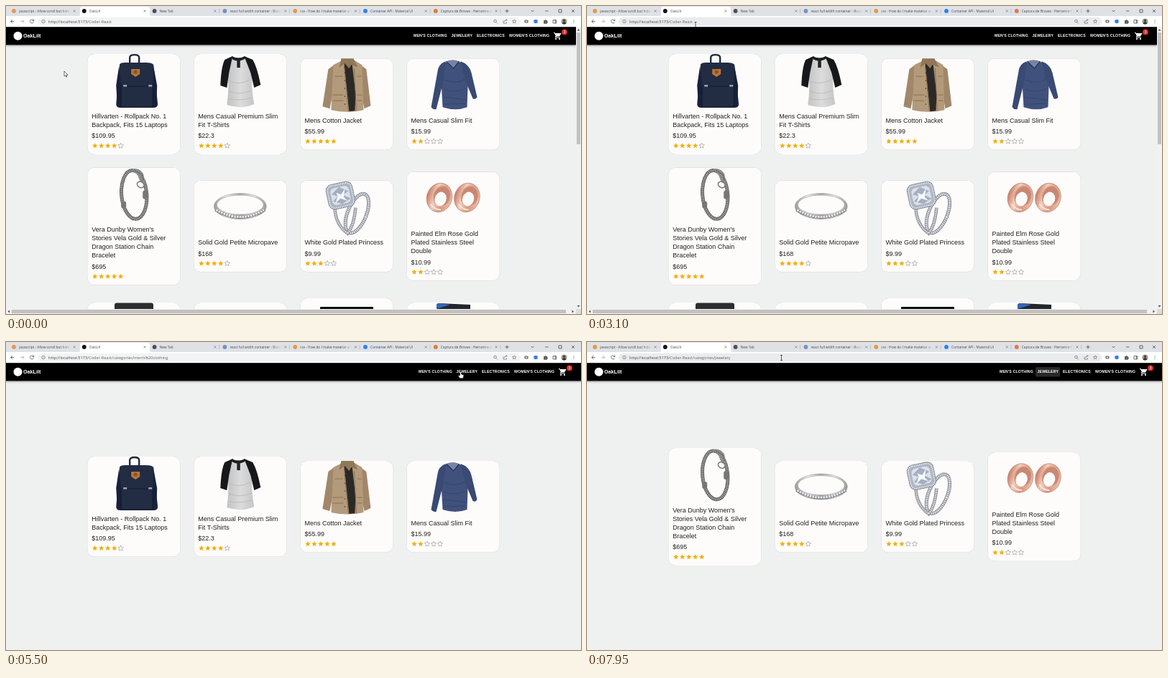
An HTML page for the animation above (8000 ms loop, 800x430 px).

```html
<!DOCTYPE html>
<html lang="en">
<head>
<meta charset="utf-8">
<title>Shop navigation</title>
<style>
html, body { margin: 0; width: 100%; height: 100%; overflow: hidden; background: #eff1f0; }
svg { display: block; }
.ui { font-family: "Open Sans", "Noto Sans", sans-serif; }
.page { font-family: "Liberation Sans", Arial, sans-serif; }
.title { font-size: 9px; fill: #212121; }
.link { font-size: 5.2px; font-weight: bold; letter-spacing: .15px; fill: #fff; }
.card { fill: #fdfcfb; filter: drop-shadow(0 .8px .7px rgba(0,0,0,.32)); }
.icon { fill: none; stroke: #5f6368; stroke-width: .9; }
.bar { filter: drop-shadow(0 1px 1.5px rgba(0,0,0,.4)); }
</style>
</head>
<body>
<svg id="stage" width="800" height="430" viewBox="0 0 800 430"></svg>
<script>
const LOOP = 8000, MENS_AT = 4900, JEWELERY_AT = 7600;
const STAR = "M12 17.27 18.18 21l-1.64-7.03L22 9.24l-7.19-.61L12 2 9.19 8.63 2 9.24l5.46 4.73L5.82 21z";
const CART = "M7 18c-1.1 0-2 .9-2 2s.9 2 2 2 2-.9 2-2-.9-2-2-2zM1 2v2h2l3.6 7.6-1.4 2.4c-.7 1.4.3 3 1.8 3h12v-2H7.4l1.1-2h7.5c.7 0 1.4-.4 1.7-1L21.7 5c.3-.7-.1-1-.9-1H5.2l-.9-2zM17 18c-1.1 0-2 .9-2 2s.9 2 2 2 2-.9 2-2-.9-2-2-2z";

const path = (d, fill, extra = "") => `<path d="${d}" fill="${fill}" ${extra}/>`;
const line = (d, color, width = 1, extra = "") =>
  path(d, "none", `stroke="${color}" stroke-width="${width}" ${extra}`);
const rect = (x, y, w, h, fill, r = 0) =>
  `<rect x="${x}" y="${y}" width="${w}" height="${h}" rx="${r}" fill="${fill}"/>`;
const dot = (x, y, r, fill) => `<circle cx="${x}" cy="${y}" r="${r}" fill="${fill}"/>`;
const oval = (x, y, rx, ry, angle, attrs) =>
  `<ellipse cx="${x}" cy="${y}" rx="${rx}" ry="${ry}" transform="rotate(${angle} ${x} ${y})" ${attrs}/>`;
const move = (x, y, body) => `<g transform="translate(${x} ${y})">${body}</g>`;

// Product pictures, in card coordinates
const backpack =
  line("M59 14V5Q59 1 65.500 1T72 5V14", "#20293c", 2.4) +
  path("M45 14Q47 12 52 12H82Q90 12 92 15L98 70Q98 75 92 75H46Q40 75 40 70Z", "#222c43") +
  path("M44 17 40 44 42 74H47V44ZM92 17 97 44 96 74H91V44Z", "#18213a") +
  line("M47 45H92M47 47V74H91V47", "#121a2d", .9) +
  path("M61 21H73V28L67 32 61 28Z", "#b87539") + dot(67, 25, 2.5, "#8a5125") +
  rect(50, 43, 5, 2.5, "#a3a8ae") + rect(85, 43, 5, 2.5, "#a3a8ae");

const raglan =
  path("M51 5H71L82 22Q79 45 84 70 66 78 46 71 50 45 46 20Z", "url(#cotton)") +
  path("M54 3 43 8Q38 18 37 44L46 47 49 26Z", "#17181b") +
  path("M70 3 82 8Q88 18 93 43L84 47 79 26Z", "#17181b") +
  path("M53 3Q62 8 71 3L72 6Q62 13 53 7Z", "#1d1e21") + rect(60, 8, 4.5, 11, "#222327") +
  line("M50 38Q62 44 78 36M49 52Q64 58 80 51M48 62Q62 66 81 61", "#b3b3b4", .7);

const jacket =
  path("M47 9 39 15 31 67 41 70 48 35ZM84 9 92 15 98 66 89 70 83 35Z", "#a1876a") +
  path("M46 9 58 3H76L86 9 88 72Q66 77 43 72Z", "#b29a7b") +
  path("M61 6H72L77 50 76 73 68 74Z", "#2c2826") +
  path("M57 0H74L80 12 71 9 68 14 62 7 54 13Z", "#8f7758") +
  line("M61 10 67 74M75 14 78 73M48 25H59M79 25H85M45 51H60M79 51H86M45 59H60M79 59H86", "#7e674a", .8) +
  [20, 31, 42, 53, 64].map(y => dot(62, y, .8, "#57462f")).join("");

const sweater =
  path("M53 5H75L86 12 84 68Q68 74 50 68L47 14Z", "#40517b") +
  path("M54 4Q44 8 43 18L34 68Q37 72 41 71L51 32ZM75 4Q87 8 90 20L98 54Q96 58 92 56L82 32Z", "#394a73") +
  path("M55 4Q64 0 73 4L65 14Z", "#7883a2") + line("M55 4 65 14 73 4", "#25345a", 1.3) +
  line("M53 30Q68 37 81 29M52 43Q66 49 83 42M51 54 83 58M51 64 82 63", "#32426a", .8);

const bracelet =
  oval(65, 38, 17.5, 34, -5, 'fill="none" stroke="#686868" stroke-width="5"') +
  oval(65, 38, 17.5, 34, -5, 'fill="none" stroke="#b4b4b4" stroke-width="3" stroke-dasharray="1 1.4"') +
  path("M63 2Q72 0 78 9L80 20 74 21 70 11Z", "#8d8d8d") + line("M66 4 76 10 78 18", "#444", 1, 'stroke-dasharray="2 1"') +
  oval(74, 24, 5, 4, 30, 'fill="#fdfcfb" stroke="#777" stroke-width="1.600"') +
  rect(77, 32, 8, 12, "#777", 3) + rect(47, 47, 7, 10, "#777", 3);

const band =
  path("M28 36a36.500 18 0 1 0 73 0a36.500 18 0 1 0-73 0M32 34a32.500 13.500 0 1 1 65 0a32.500 13.500 0 1 1-65 0", "url(#silver)", 'fill-rule="evenodd" stroke="#8b8b8b" stroke-width=".5"') +
  line("M30 41Q64 62 99 41", "#77787b", 4) + line("M31 41Q64 61 98 41", "#e8e8ea", 3, 'stroke-dasharray="2.800 1"');

const diamond =
  oval(79, 46, 13, 29, 22, 'fill="none" stroke="#8d9098" stroke-width="5"') +
  oval(79, 46, 13, 29, 22, 'fill="none" stroke="#dfe1e6" stroke-width="3" stroke-dasharray="1.600 1"') +
  line("M48 36Q48 61 66 74Q75 62 77 38", "#92959c", 4.5) +
  line("M48 36Q48 61 66 74Q75 62 77 38", "#dcdfe3", 2.4, 'stroke-dasharray="1.600 1"') +
  `<g transform="rotate(-12 56 21)">${rect(37, 3, 38, 36, "#858b98", 9)}
    <rect x="39" y="5" width="34" height="32" rx="7" fill="#aeb5c1" stroke="#e6e9ee" stroke-width="2.200" stroke-dasharray="1.500 1"/>
    ${rect(43, 9, 26, 24, "#dae1ec", 6)}` +
  path("M44 17 56 9 68 17 60 21 69 28 56 33 44 27 52 21Z", "#a5afc0") +
  path("M51 16 57 20 64 13 60 24 64 30 55 25 47 30 52 21Z", "#f7f9fc") + "</g>";

const roseRing = angle =>
  oval(0, 0, 17.5, 20.5, angle, 'fill="url(#rose)" stroke="#b8735d" stroke-width=".6"') +
  oval(angle / 5, -2, 12.500, 15, angle, 'fill="#c98872"') +
  oval(angle / 5, -2, 12, 14.500, angle, 'fill="none" stroke="#edc2ae" stroke-width="2" stroke-dasharray=".8 .8"') +
  oval(angle / 5 - 2, 2, 8, 10, angle, 'fill="#fdfcfb"') +
  line("M-12 9Q-7 17 2 17", "#fbe5da", 2);
const roseRings = move(45.500, 36, roseRing(18)) + move(84, 36, roseRing(18));

const product = (lines, price, stars, art) => ({ lines, price, stars, art });
const mens = [
  product(["Hillvarten - Rollpack No. 1", "Backpack, Fits 15 Laptops"], "$109.95", 4, backpack),
  product(["Mens Casual Premium Slim", "Fit T-Shirts"], "$22.3", 4, raglan),
  product(["Mens Cotton Jacket"], "$55.99", 5, jacket),
  product(["Mens Casual Slim Fit"], "$15.99", 2, sweater)
];
const jewelery = [
  product(["Vera Dunby Women's", "Stories Vela Gold &amp; Silver", "Dragon Station Chain", "Bracelet"], "$695", 5, bracelet),
  product(["Solid Gold Petite Micropave"], "$168", 4, band),
  product(["White Gold Plated Princess"], "$9.99", 3, diamond),
  product(["Painted Elm Rose Gold", "Plated Stainless Steel", "Double"], "$10.99", 2, roseRings)
];

const cardX = column => 113.2 + 148.1 * column;
const cardBox = height => `<rect class="card" width="129.300" height="${height}" rx="10"/>`;
const stars = (count, y) => [0, 1, 2, 3, 4].map(i =>
  `<path d="${STAR}" transform="translate(${6 + 9 * i} ${y - 4.6}) scale(.375)" ${i < count
    ? 'fill="#f5ad0c"' : 'fill="none" stroke="#9c9c9c" stroke-width="1.800"'}/>`).join("");

function card({ lines, price, stars: count, art }, column, centerY) {
  const height = 115.6 + 12.1 * lines.length;
  const priceY = 92.9 + 12.1 * lines.length;
  const text = lines.map((words, i) => `<text class="title" x="6" y="${89.7 + 12.1 * i}">${words}</text>`).join("");
  return move(cardX(column), centerY - height / 2, cardBox(height) + art + text +
    `<text class="title" x="6" y="${priceY}">${price}</text>` + stars(count, priceY + 10.8));
}
const row = (products, centerY) => products.map((p, i) => card(p, i, centerY)).join("");

const links = [["MEN'S CLOTHING", 567], ["JEWELERY", 619.5], ["ELECTRONICS", 655], ["WOMEN'S CLOTHING", 700]];
const navbar = (width, shift, focus = "") =>
  `<rect class="bar" y="29" width="${width}" height="25.300"/>` + focus +
  dot(16.5, 41.7, 6, "#fff") +
  '<text x="24" y="44.300" font-size="7.200" font-weight="bold" fill="#fff">OakLilt</text>' +
  move(shift, 0, links.map(([name, x]) => `<text class="link" x="${x}" y="43.300">${name}</text>`).join("") +
    `<path d="${CART}" fill="#fff" transform="translate(761.500 36) scale(.5)"/>` +
    dot(777, 36.4, 3.9, "#e0302f") +
    '<text x="777" y="38.100" font-size="4.800" fill="#fff" text-anchor="middle">3</text>');

const scrollbars =
  rect(793, 29, 7, 401, "#f1f1f1") + rect(0, 423, 800, 7, "#f1f1f1") + rect(793, 423, 7, 7, "#dcdcdc") +
  rect(794, 37, 5, 156, "#c1c1c1") + rect(8, 424, 771, 5, "#c1c1c1") +
  path("M794.500 34.500 796.500 32 798.500 34.500Z", "#505050") +
  path("M794.500 418 796.500 420.500 798.500 418Z M5 424.500 2.500 426.500 5 428.500Z M787.500 424.500 790 426.500 787.500 428.500Z", "#505050");

const nextRow =
  [414, 414, 408, 414].map((y, i) => move(cardX(i), y, cardBox(140))).join("") +
  rect(151, 414.5, 54, 20, "#2d2d30", 3) + rect(437, 420, 74, 9, "#08080a", 1) +
  path("M599 430V418Q599 415 603 415L646 417V430Z", "#25262b") + path("M599 423V417Q600 415 604 415L618 417Z", "#3565b8");

const pages = [
  row(mens, 137) + row(jewelery, 307.4) + nextRow + navbar(793, 0) + scrollbars,
  row(mens, 229.9) + navbar(800, 7),
  row(jewelery, 229.9) + navbar(800, 7, rect(624, 35, 34, 13.5, "#292929", 1.5))
];

const tabs = [
  ["javascript - Allow scroll but hide scrollbar", "#e8964c"], ["OakLilt", "#111"], ["New Tab", "#4d5156"],
  ["react full width container - Buscar", "#7b8fc0"], ["css - How do I make material ui co", "#e8964c"],
  ["Container API - Material UI", "#2684f5"], ["Captura de Brovex - Herramienta", "#e27a3f"]
];
const tab = ([title, color], i) => {
  const x = 97.8 * i;
  return dot(x + 11, 7, 2.9, color) +
    `<svg x="${x + 18}" width="73" height="14"><text y="8.700" font-size="4.800" fill="url(#fade)">${title}</text></svg>` +
    line(`M${x + 93.7} 5.500l3 3m0-3l-3 3`, "#5f6368", .6) +
    (i > 1 ? line(`M${x + 101} 4v6`, "#9a9da3", .5) : "");
};

const browser =
  rect(0, 0, 800, 14.5, "#dee1e6") + path("M100 14.500Q103 14 103 11V4Q103 1 106 1H197Q200 1 200 4V11Q200 14 203 14.500Z", "#fff") +
  tabs.map(tab).join("") +
  line("M694.500 7h5M697 4.500v5", "#45494d", .8) +
  line("M730.500 6l2 2 2-2M750 7h4.500M769 5h4v4h-4ZM787 5l4 4m0-4l-4 4", "#33363a", .7) +
  rect(0, 14, 800, 15.2, "#fff") +
  '<rect id="omnibox" x="44" y="15.800" width="672" height="12" rx="6"/>' +
  '<g class="icon"><path d="M11.500 21.500H6.500M9 19 6.500 21.500 9 24M38.300 20a2.600 2.600 0 1 0 .2 2.500M38.800 18.500v2h-2"/>' +
  '<path d="M20 21.500h5M22.500 19 25 21.500 22.500 24" stroke="#b5b8bc"/>' +
  '<circle cx="52" cy="21.500" r="2.300" stroke-width=".6"/><path d="M52 21.200v1.500M52 20v.5" stroke-width=".6"/>' +
  '<circle cx="680.500" cy="21" r="1.800" stroke-width=".7"/><path d="M682 22.500l1.800 1.800M692 20.500v3.500h4.500v-1.500M693.500 22q.5-2.500 3-2.500M695.500 18l1.500 1.500-1.500 1.500" stroke-width=".7"/></g>' +
  `<path class="icon" d="${STAR}" transform="translate(704 18.300) scale(.26)" style="stroke-width:2.300"/>` +
  rect(721.5, 19.5, 5, 4, "#6b6f75", .8) + dot(724, 21.5, 1, "#fff") +
  dot(737, 21.5, 2.8, "#3a7fe0") +
  path("M748 20h1.500a1 1 0 1 1 2 0h1.500v1.500a1 1 0 1 1 0 2v1.200h-5Z", "#5f6368") +
  '<path class="icon" d="M761 19.500h4.500v4.500h-4.500ZM764.300 19.500v4.500"/>' +
  dot(776.5, 21.5, 4, "#9c9c86") + dot(776.5, 20.2, 1.5, "#38342f") + path("M773.600 24.200Q776.500 20 779.400 24.200 776.500 27 773.600 24.200Z", "#38342f") +
  [19.5, 21.5, 23.5].map(y => dot(790, y, .6, "#5f6368")).join("") +
  '<text x="59" y="23.500" font-size="5.600" fill="#5f6368"><tspan fill="#3c4043">http://localhost:5173</tspan>/Coder-React<tspan id="route"></tspan></text>';

const pointers = {
  arrow: path("M0 0V7.200L1.700 5.700 2.800 8.200 4 7.700 2.900 5.300H5.100Z", "#fff", 'stroke="#111" stroke-width=".6"'),
  hand: path("M-1 .8Q0-.6 1 .8V4L3.800 4.700Q4.500 5 4.300 6L3.500 9.700H-1L-3.200 6.400Q-3.300 5 -1 6Z", "#fff", 'stroke="#111" stroke-width=".6"'),
  beam: line("M-1.500-3.500H1.500M0-3.500V3.500M-1.500 3.500H1.500", "#222", .7)
};

const gradient = (id, stops, extra = "") => `<linearGradient id="${id}" ${extra}>${stops.map((color, i) =>
  `<stop offset="${i / (stops.length - 1)}" stop-color="${color}"/>`).join("")}</linearGradient>`;
const defs = "<defs>" +
  gradient("fade", ["#45494d", "#45494d", "#45494d", "#45494d", "#45494d", "#dee1e6"], 'gradientUnits="userSpaceOnUse" x1="0" x2="73" y1="0" y2="0"') +
  gradient("cotton", ["#c2c2c3", "#dcdcdc", "#c6c6c7"]) +
  gradient("silver", ["#999", "#f1f1f1", "#a6a6a6", "#eee", "#999"]) +
  gradient("rose", ["#c77d66", "#f4cfbd", "#d6957e", "#efc0aa"]) + "</defs>";

const stage = document.getElementById("stage");
stage.innerHTML = defs + rect(0, 0, 800, 430, "#eff1f0") +
  pages.map(body => `<g class="page">${body}</g>`).join("") +
  `<g class="ui">${browser}</g><g id="cursor">${Object.entries(pointers).map(([name, shape]) =>
    `<g id="${name}">${shape}</g>`).join("")}</g>`;

const find = id => document.getElementById(id);
const pageGroups = [...stage.querySelectorAll(".page")];
const routes = ["", "/categories/men's%20clothing", "/categories/jewelery"];
const show = (element, visible) => element.setAttribute("display", visible ? "inline" : "none");

// Pointer path: time, x, y
const stops = [
  [0, 81, 91], [680, 81, 91], [790, 74, -12], [2150, 90, -12], [2550, 70, 24], [2950, 146, 25],
  [3100, 151, 26], [3800, 566, 44], [4300, 580, 44], [4450, 600, 43], [4750, 600, 43],
  [5300, 632.5, 41], [5500, 632.5, 41], [6300, 227.5, 27], [6500, 227.5, 27], [6900, 300, 24],
  [7200, 300, 24], [7500, 640, 41], [7600, 640, 41], [7950, 270.5, 22], [LOOP, 270.5, 22]
];
function pointerAt(time) {
  const next = stops.findIndex(stop => stop[0] > time);
  const [t0, x0, y0] = stops[next - 1], [t1, x1, y1] = stops[next];
  const p = (time - t0) / (t1 - t0), eased = p * p * (3 - 2 * p);
  return [x0 + (x1 - x0) * eased, y0 + (y1 - y0) * eased];
}

function draw(now) {
  const time = Math.floor(now % LOOP / 50) * 50;
  const page = time < MENS_AT ? 0 : time < JEWELERY_AT ? 1 : 2;
  const [x, y] = pointerAt(time);
  const inUrl = x > 44 && x < 716 && y > 15 && y < 29;
  const kind = inUrl ? "beam" : x > 566 && y > 35 && y < 50 ? "hand" : "arrow";
  pageGroups.forEach((group, i) => show(group, i === page));
  Object.keys(pointers).forEach(name => show(find(name), name === kind));
  find("cursor").setAttribute("transform", `translate(${x} ${y})`);
  find("omnibox").setAttribute("fill", inUrl ? "#e9ebee" : "#f1f3f4");
  find("route").textContent = routes[page];
  requestAnimationFrame(draw);
}
requestAnimationFrame(draw);
</script>
</body>
</html>
```
